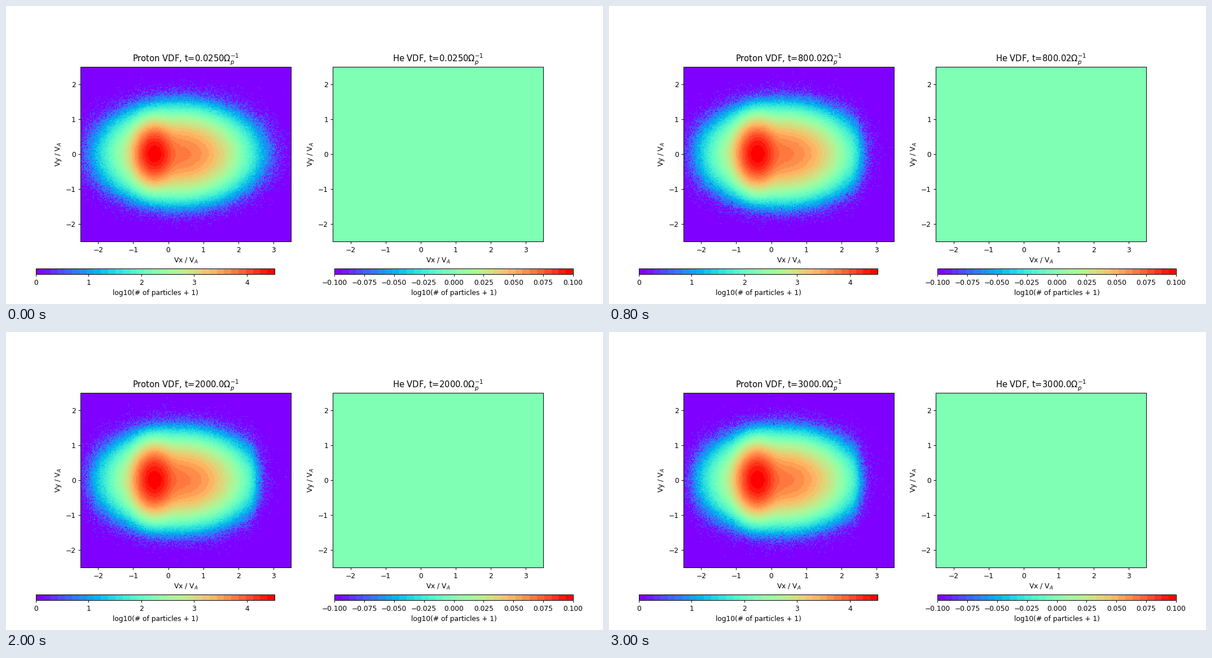
Recreate the animation shown at these times as a matplotlib script. Size 1058 by 529 pixels, loop 3200 ms.

```python
import numpy as np
import matplotlib.pyplot as plt
from matplotlib.animation import FuncAnimation

W, H = 1058, 529
FRAMES, INTERVAL = 16, 200
BINS = 200
EXTENT = (-2.5, 3.5, -2.5, 2.5)
VMAX = 4.526
CMAP = plt.get_cmap("rainbow", 33)

plt.rcParams["font.family"] = "DejaVu Sans"


def centers(lo, hi):
    step = (hi - lo) / BINS
    return lo + step * (np.arange(BINS) + 0.5)


X, Y = np.meshgrid(centers(*EXTENT[:2]), centers(*EXTENT[2:]))


def bump(peak, x0, sx, sy):
    return peak * np.exp(-((X - x0) / sx) ** 2 / 2 - (Y / sy) ** 2 / 2)


def tail_loss(depth, dist, scale):
    """Drop in log10 counts beyond the point where dist turns positive."""
    return depth * (1 - np.exp(-(np.maximum(dist, 0) / scale) ** 2))


def counts(i):
    """Noisy particle counts: a dense core plus a wide drifting beam."""
    grow = 1 - np.exp(-i / 3.5)
    beam = bump(10 ** 3.76, 0.3, 0.69, 0.437)
    loss = tail_loss(1.6 * grow, X - 2.3, 0.45)
    loss = loss + tail_loss(0.5 * grow, -X - 2.0, 0.4)
    core = bump(28000, -0.4, 0.245 + 0.008 * grow, 0.335 + 0.03 * grow)
    rng = np.random.default_rng(100 + i)
    return rng.poisson(beam * 10 ** -loss + core)


def title(name, i):
    stamp = f"{200 * i + 0.025:.4f}"[:6]
    return f"{name} VDF, t={stamp}" + r"$\Omega_p^{-1}$"


fig = plt.figure(figsize=(12, 6), dpi=H / 6, facecolor="white")
AX_W = 0.775 / 2.2
AX_H = AX_W * W * 5 / 6 / H


def panel(left, bar_left, vmin, vmax, ticks, fmt):
    ax = fig.add_axes([left, 0.5025 - AX_H / 2, AX_W, AX_H])
    im = ax.imshow(np.zeros((BINS, BINS)), extent=EXTENT, origin="lower",
                   aspect="auto", interpolation="nearest",
                   cmap=CMAP, vmin=vmin, vmax=vmax)
    ax.set_xticks(range(-2, 4))
    ax.set_yticks(range(-2, 3))
    ax.set_xlabel("Vx / V$_A$")
    ax.set_ylabel("Vy / V$_A$")
    cax = fig.add_axes([bar_left, 0.1, 0.4, 0.02])
    bar = fig.colorbar(im, cax=cax, orientation="horizontal")
    bar.set_ticks(ticks)
    bar.set_ticklabels([format(t, fmt).replace("-", "\u2212") for t in ticks])
    bar.set_label("log10(# of particles + 1)")
    return ax, im


proton_ax, proton_im = panel(0.125, 0.05, 0, VMAX, range(5), "d")
he_ax, he_im = panel(0.9 - AX_W, 0.55, -0.1, 0.1,
                     [k * 0.025 for k in range(-4, 5)], ".3f")


def update(i):
    proton_im.set_data(np.log10(counts(i) + 1))
    proton_ax.set_title(title("Proton", i))
    he_ax.set_title(title("He", i))
    return []


anim = FuncAnimation(fig, update, frames=FRAMES, interval=INTERVAL,
                     init_func=lambda: update(0), repeat=True,
                     repeat_delay=0, blit=False)
plt.show()
```
